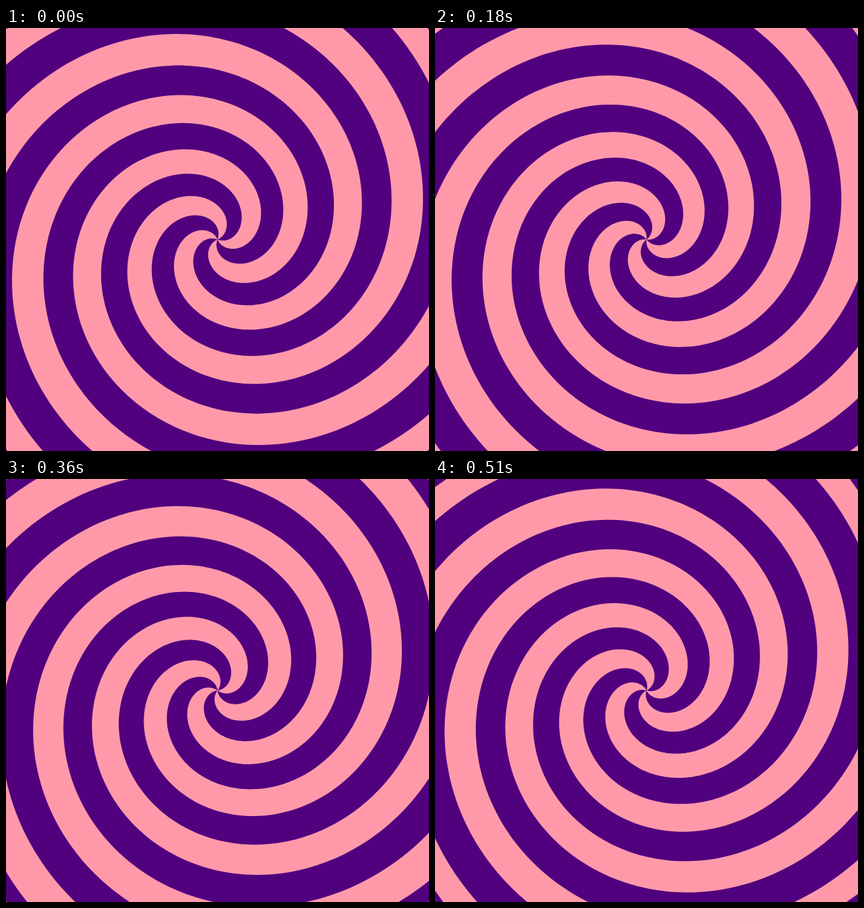
Write an HTML page with a canvas that moves like this. It is 640 px wide and 640 px high and loops after 0.54 s.

```html
<!DOCTYPE html>
<html lang="en">
<head>
<meta charset="utf-8">
<title>Spiral</title>
<style>
  html, body { margin: 0; height: 100%; overflow: hidden; background: #ff99aa; }
  canvas { display: block; }
</style>
</head>
<body>
<canvas id="stage" width="640" height="640"></canvas>
<script>
const ctx = document.getElementById('stage').getContext('2d');
const ARMS = 4, STEP_MS = 30, STEPS = 18, MAX_TURN = 8.4;
const SLOPE = 42.17, GROWTH = 0.0671;
const quarter = Math.PI / 2;

// Radius grows a little faster with every turn
const radius = turn => SLOPE / GROWTH * (Math.exp(GROWTH * turn) - 1);

function edgePoint(path, start, turn) {
  const r = radius(turn), angle = start + turn;
  path.lineTo(r * Math.cos(angle), -r * Math.sin(angle));
}

const spiral = new Path2D();
for (let arm = 0; arm < ARMS; arm++) {
  const middle = arm * quarter, half = quarter / 4;
  spiral.moveTo(0, 0);
  for (let turn = 0; turn <= MAX_TURN; turn += 0.03) edgePoint(spiral, middle - half, turn);
  for (let turn = MAX_TURN; turn >= 0; turn -= 0.03) edgePoint(spiral, middle + half, turn);
  spiral.closePath();
}

function draw() {
  const step = Math.floor(performance.now() / STEP_MS) % STEPS;
  ctx.setTransform(1, 0, 0, 1, 0, 0);
  ctx.fillStyle = '#ff99aa';
  ctx.fillRect(0, 0, 640, 640);
  ctx.translate(320, 320);
  ctx.rotate(quarter * step / STEPS);
  ctx.fillStyle = '#51007e';
  ctx.fill(spiral);
  requestAnimationFrame(draw);
}
draw();
</script>
</body>
</html>
```
